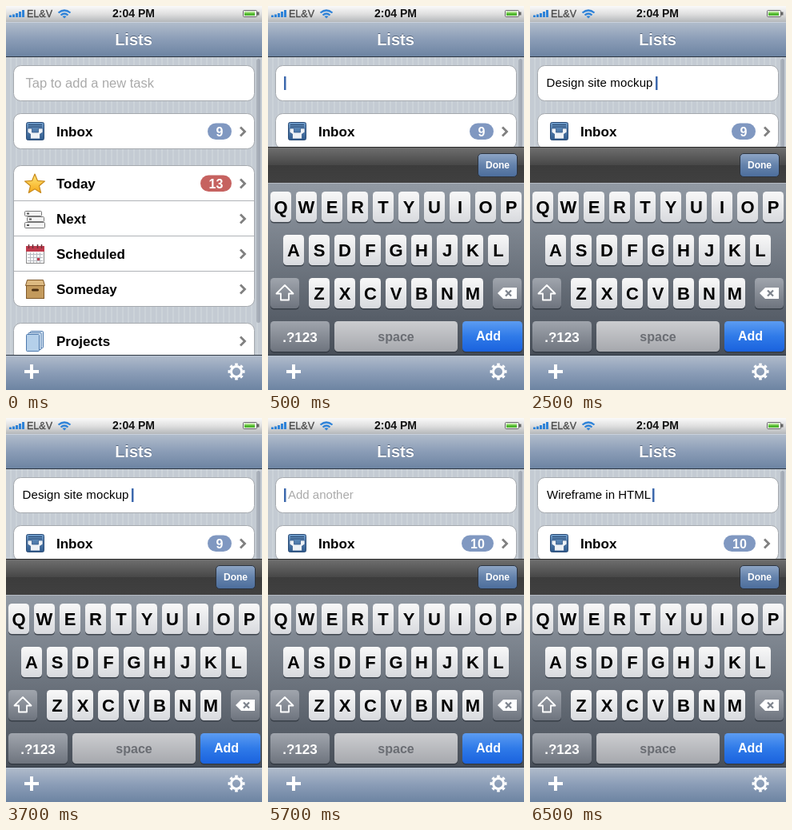
These frames come from a looping animation (320 px wide and 480 px high, 8 s). An HTML page:

```html
<!DOCTYPE html>
<html lang="en">
<head>
<meta charset="utf-8">
<title>Task list</title>
<style>
html, body { margin: 0; width: 100%; height: 100%; overflow: hidden; background: #c5ccd4; }
svg { display: block; width: 100%; height: 100%; }
text { font-family: "Liberation Sans", Arial, Helvetica, sans-serif; }
.bold { font-weight: bold; }
.row { font: bold 17px "Liberation Sans", Arial, sans-serif; }
.field { font-size: 15px; }
.hint { fill: #aaa; }
.mid { text-anchor: middle; }
.badge { font-size: 16px; font-weight: bold; fill: #fff; text-anchor: middle; }
.title { font-size: 20px; fill: #fff; text-shadow: 0 -1px 0 rgba(40,55,80,.6); }
.cap { font-size: 22px; font-weight: bold; text-anchor: middle; }
.cell { fill: #fff; stroke: #a5a9ae; }
.chevron { fill: none; stroke: #808080; stroke-width: 2.8; }
.caret { fill: #3d69ad; }

/* hard cuts at 0.5, 2.5, 4.5 and 6.5 s */
.cut { visibility: hidden; animation: 8s step-end infinite; }
.idle { animation-name: idle; }
.typing { animation-name: typing; }
.empty { animation-name: empty; }
.first { animation-name: first; }
.again { animation-name: again; }
.second { animation-name: second; }
.nine { animation-name: nine; }
.ten { animation-name: ten; }
@keyframes idle { 0% { visibility: visible } 6.25%, 100% { visibility: hidden } }
@keyframes typing { 0% { visibility: hidden } 6.25%, 100% { visibility: visible } }
@keyframes empty { 0% { visibility: hidden } 6.25% { visibility: visible } 31.25%, 100% { visibility: hidden } }
@keyframes first { 0% { visibility: hidden } 31.25% { visibility: visible } 56.25%, 100% { visibility: hidden } }
@keyframes again { 0% { visibility: hidden } 56.25% { visibility: visible } 81.25%, 100% { visibility: hidden } }
@keyframes second { 0% { visibility: hidden } 81.25%, 100% { visibility: visible } }
@keyframes nine { 0% { visibility: visible } 56.25%, 100% { visibility: hidden } }
@keyframes ten { 0% { visibility: hidden } 56.25%, 100% { visibility: visible } }
</style>
</head>
<body>
<svg viewBox="0 0 320 480">
<defs>
  <pattern id="stripes" width="7" height="7" patternUnits="userSpaceOnUse">
    <rect width="7" height="7" fill="#c4cbd3"/><rect x="5" width="2" height="7" fill="#ccd3d9"/>
  </pattern>
  <linearGradient id="status" x2="0" y2="1"><stop stop-color="#fafafa"/><stop offset=".5" stop-color="#dfdfdf"/><stop offset="1" stop-color="#b4b7ba"/></linearGradient>
  <linearGradient id="bar" x2="0" y2="1"><stop stop-color="#b2bdcc"/><stop offset=".5" stop-color="#8b9db7"/><stop offset="1" stop-color="#6d84a2"/></linearGradient>
  <linearGradient id="dark" x2="0" y2="1"><stop stop-color="#707070"/><stop offset=".5" stop-color="#484848"/><stop offset=".52" stop-color="#3c3c3c"/><stop offset="1" stop-color="#404040"/></linearGradient>
  <linearGradient id="board" x2="0" y2="1"><stop stop-color="#929aa4"/><stop offset="1" stop-color="#474e58"/></linearGradient>
  <linearGradient id="key" x2="0" y2="1"><stop stop-color="#f8f8f8"/><stop offset="1" stop-color="#d8dade"/></linearGradient>
  <linearGradient id="gray" x2="0" y2="1"><stop stop-color="#a0a5ad"/><stop offset="1" stop-color="#6e747e"/></linearGradient>
  <linearGradient id="space" x2="0" y2="1"><stop stop-color="#cccdd0"/><stop offset="1" stop-color="#a6a8ad"/></linearGradient>
  <linearGradient id="blue" x2="0" y2="1"><stop stop-color="#5c9cf2"/><stop offset=".5" stop-color="#2f7ae8"/><stop offset="1" stop-color="#1a62de"/></linearGradient>
  <linearGradient id="done" x2="0" y2="1"><stop stop-color="#8fa6c6"/><stop offset=".5" stop-color="#6482ab"/><stop offset="1" stop-color="#4c6d9c"/></linearGradient>
  <linearGradient id="gold" x2="0" y2="1"><stop stop-color="#ffe97a"/><stop offset="1" stop-color="#f6a716"/></linearGradient>
  <linearGradient id="steel" x2="0" y2="1"><stop stop-color="#6d9ac8"/><stop offset="1" stop-color="#2f5a8c"/></linearGradient>
  <path id="chev" class="chevron" d="M-4-5.5 1.5 0-4 5.5"/>
</defs>

<rect width="320" height="480" fill="url(#stripes)"/>

<!-- lists -->
<rect class="cell" x="9.5" y="74.5" width="301" height="44" rx="9"/>
<rect class="cell" x="9.5" y="134.5" width="301" height="44" rx="9"/>
<rect class="cell" x="9.5" y="199.5" width="301" height="176" rx="9"/>
<rect class="cell" x="9.5" y="396.5" width="301" height="60" rx="9"/>
<path d="M10 243.5H310M10 287.5H310M10 331.5H310" stroke="#b0b3b7"/>
<g class="row">
  <text x="63" y="163">Inbox</text>
  <text x="63" y="228">Today</text>
  <text x="63" y="272">Next</text>
  <text x="63" y="316">Scheduled</text>
  <text x="63" y="360">Someday</text>
  <text x="63" y="425">Projects</text>
</g>
<use href="#chev" x="297" y="157"/><use href="#chev" x="297" y="222"/><use href="#chev" x="297" y="266"/>
<use href="#chev" x="297" y="310"/><use href="#chev" x="297" y="354"/><use href="#chev" x="297" y="419"/>
<g class="cut nine"><rect x="252" y="146.500" width="30" height="20.500" rx="10.250" fill="#8098c1"/><text class="badge" x="267" y="162.500">9</text></g>
<g class="cut ten"><rect x="242" y="146.500" width="40" height="20.500" rx="10.250" fill="#8098c1"/><text class="badge" x="262" y="162.500">10</text></g>
<rect x="243" y="211.500" width="39" height="20.500" rx="10.250" fill="#c66260"/><text class="badge" x="262.500" y="227.500">13</text>

<!-- inbox tray -->
<rect x="25.500" y="145.500" width="22" height="22" rx="2" fill="url(#steel)" stroke="#2c4d77"/>
<path d="M28 148.500H45M28 151H45" stroke="#26476f" stroke-width="1.200"/>
<path d="M27 153H32.500V158H40.500V153H46V158L42.500 160V166H30.500V160L27 158Z" fill="#eef2f6" stroke="#3a5f8d" stroke-width=".8"/>
<!-- star -->
<path id="star" fill="url(#gold)" stroke="#c98a1c" stroke-width="1.200" stroke-linejoin="round"/>
<!-- drawers -->
<g fill="#f3f3f3" stroke="#777">
  <rect x="23.500" y="256.500" width="21" height="6" rx="1"/>
  <rect x="26.500" y="263.500" width="21" height="6" rx="1"/>
  <rect x="23.500" y="270.500" width="25" height="7" rx="1"/>
  <path d="M26 259.500H29M29 266.500H32M26 274H29" stroke="#555" stroke-width="2"/>
</g>
<!-- calendar -->
<rect x="25.500" y="300.500" width="22" height="21" fill="#fafafa" stroke="#8a8a8a"/>
<rect x="25" y="300" width="23" height="7" fill="#bf3a4c"/>
<path d="M28.500 298V303M33.500 298V303M39.500 298V303M44.500 298V303" stroke="#6b3038" stroke-width="1.500"/>
<path d="M27 310.500H46M27 314.500H46M27 318.500H46M30.500 308V321M34.500 308V321M38.500 308V321M42.500 308V321" stroke="#b9bcc2"/>
<rect x="39" y="315" width="3" height="3" fill="#bf3a4c"/>
<!-- box -->
<rect x="25.500" y="349.500" width="22" height="16" fill="#c39a5d" stroke="#80592a"/>
<path d="M26.500 342.500H46.500L48.500 349.500H24.500Z" fill="#dcb981" stroke="#80592a"/>
<rect x="32" y="353.500" width="9" height="3" rx="1.500" fill="#4c2f12"/>
<!-- pages -->
<g fill="#dbe8f5" stroke="#4d79ad">
  <rect x="30.500" y="406.500" width="16" height="21" rx="1"/>
  <rect x="28" y="408.500" width="16" height="21" rx="1"/>
  <rect x="25.500" y="410.500" width="16" height="21" rx="1" fill="#b5d0ea"/>
</g>
<rect x="313" y="66" width="5" height="330" rx="2.500" fill="#596270" opacity=".3"/>

<!-- task field -->
<text class="hint cut idle" x="24.500" y="101.500" font-size="16.500" textLength="">Tap to add a new task</text>
<rect class="caret cut empty" x="20" y="88" width="2.500" height="17"/>
<g class="cut first"><text class="field" x="20.500" y="101" letter-spacing=".12">Design site mockup</text><rect class="caret" x="157" y="88" width="2.500" height="17"/></g>
<g class="cut again"><text class="field hint" x="25" y="101">Add another</text><rect class="caret" x="20" y="88" width="2.500" height="17"/></g>
<g class="cut second"><text class="field" x="21" y="101">Wireframe in HTML</text><rect class="caret" x="153" y="88" width="2.500" height="17"/></g>

<!-- keyboard -->
<g class="cut typing">
  <rect y="176" width="320" height="45" fill="url(#dark)"/>
  <path d="M0 176.500H320" stroke="#2a2a2a"/>
  <rect x="262.500" y="184.500" width="49" height="29" rx="4.500" fill="url(#done)" stroke="#2c3440"/>
  <text class="bold mid" x="287" y="203" font-size="12" fill="#fff">Done</text>
  <rect y="221" width="320" height="215" fill="url(#board)"/>
  <path d="M0 221.500H320" stroke="#b4bac2"/>
  <g id="keys"></g>
  <path d="M21 349 31.500 359.500H26V367.500H16V359.500H10.500Z" fill="none" stroke="#fff" stroke-width="1.800" stroke-linejoin="round"/>
  <path d="M287 359 294 352H311V366H294Z" fill="#fff"/>
  <path d="M297 355.500 304 362.500M304 355.500 297 362.500" stroke="#7c828c" stroke-width="2.200"/>
  <g class="bold mid">
    <text x="40" y="419.500" font-size="17" fill="#fff">.?123</text>
    <text x="160" y="419" font-size="16" fill="#6a6d73">space</text>
    <text x="275.500" y="418" font-size="16" fill="#fff">Add</text>
  </g>
</g>

<!-- bars -->
<rect width="320" height="20" fill="url(#status)"/>
<path d="M4 14V11.500H7V14ZM8 14V10.500H11V14ZM12 14V9H15V14ZM16 14V7H19V14ZM20 14V5H23V14Z" fill="#2f83d8"/>
<text x="26" y="14" font-size="12.500" fill="#4a4a4a" stroke="#4a4a4a" stroke-width=".3">EL&amp;V</text>
<g fill="none" stroke="#2f83d8" stroke-width="2.200">
  <path d="M65.500 8.500Q73 2.500 80.500 8.500M68.500 11.500Q73 7.500 77.500 11.500"/>
  <path d="M73 15.500 70.500 13Q73 11.500 75.500 13Z" fill="#2f83d8" stroke="none"/>
</g>
<text class="bold mid" x="159.500" y="14" font-size="14" fill="#111">2:04 PM</text>
<rect x="296.500" y="5.500" width="17" height="8" rx="1" fill="#eee" stroke="#666"/>
<rect x="314" y="7.500" width="2.500" height="4" fill="#666"/>
<rect x="298" y="7" width="13" height="5" fill="#4fb72e"/><rect x="298" y="7" width="13" height="2" fill="#a2e07e"/>

<rect y="20" width="320" height="43" fill="url(#bar)"/>
<path d="M0 20.500H320" stroke="#c9d1dc"/>
<path d="M0 63.500H320" stroke="#2d3642"/>
<text class="bold title mid" x="159.500" y="49">Lists</text>

<rect y="436" width="320" height="44" fill="url(#bar)"/>
<path d="M0 436.500H320" stroke="#2d3642"/><path d="M0 437.500H320" stroke="#b9c4d2"/>
<path d="M32 448V466M23 457H41" stroke="#fff" stroke-width="4"/>
<g fill="none" stroke="#fff">
  <circle cx="288" cy="457" r="6.500" stroke-width="3"/>
  <circle id="teeth" cx="288" cy="457" r="9" stroke-width="3" pathLength="16" stroke-dasharray="1 1" stroke-dashoffset=".5"/>
</g>
</svg>
<script>
const keys = document.getElementById('keys');

function add(tag, attrs, text = '') {
  const el = document.createElementNS('http://www.w3.org/2000/svg', tag);
  for (const name in attrs) el.setAttribute(name, attrs[name]);
  el.textContent = text;
  keys.append(el);
}

function key(x, y, width, fill) {
  const box = { x, width, height: 38, rx: 4.5 };
  add('rect', { ...box, y: y + 1.5, fill: '#2f353e', opacity: .8 });
  add('rect', { ...box, y, fill: `url(#${fill})` });
}

['QWERTYUIOP', 'ASDFGHJKL', 'ZXCVBNM'].forEach((row, r) => {
  const y = 232 + r * 54;
  [...row].forEach((letter, i) => {
    const cx = [16, 32, 64][r] + i * 32;
    key(cx - 13, y, 26, 'key');
    add('text', { x: cx, y: y + 27, class: 'cap' }, letter);
  });
});
key(3, 340, 36, 'gray');
key(281, 340, 36, 'gray');
key(3, 394, 74, 'gray');
key(83, 394, 154, 'space');
key(243, 394, 75, 'blue');

const points = Array.from({ length: 10 }, (_, i) => {
  const a = i * Math.PI / 5, r = i % 2 ? 5.8 : 13;
  return [36 + r * Math.sin(a), 223 - r * Math.cos(a)].map(v => v.toFixed(1));
});
document.getElementById('star').setAttribute('d', 'M' + points.join('L') + 'Z');
</script>
</body>
</html>
```
